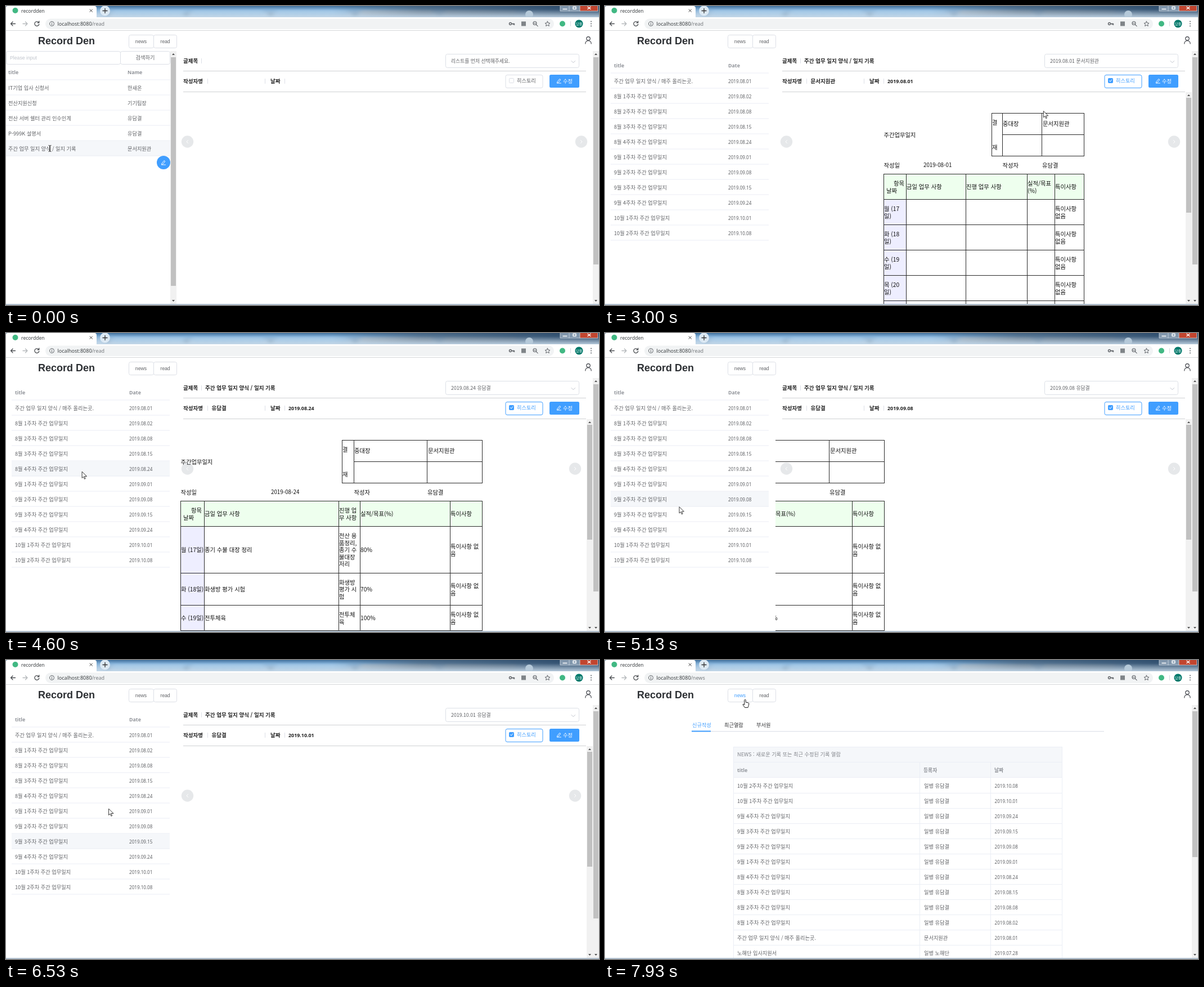
These frames come from a looping animation (1054x531 px, 8000 ms). An HTML page:

```html
<!DOCTYPE html>
<html lang="ko">
<head>
<meta charset="utf-8">
<title>recordden</title>
<style>
  html, body { margin: 0; width: 100%; height: 100%; overflow: hidden; background: #fff; }
  svg { display: block; width: 100%; height: 100%; }
  text { font: 400 9.2px 'Noto Sans CJK KR', 'Noto Sans', sans-serif; fill: #606266; white-space: pre; }
  .date { font-family: 'Noto Sans', sans-serif; font-size: 8.1px; }
  .head { font-family: 'Noto Sans', 'Noto Sans CJK KR', sans-serif; font-size: 8.8px; font-weight: 600; fill: #909399; }
  .strong { font-size: 9.5px; font-weight: 600; fill: #222; }
  .day { font: 600 8.9px 'Noto Sans', sans-serif; fill: #222; }
  .arial { font-family: 'Liberation Sans', Arial, sans-serif; font-size: 8.7px; }
  .brand { font: 700 18px 'Liberation Sans', Arial, sans-serif; fill: #2c2f33; }
  .chrome { font: 400 9px 'Noto Sans', sans-serif; fill: #3c4043; }
  .doc { font-size: 10.3px; fill: #111; }
  .pick { font-size: 8.8px; }
  .mid { text-anchor: middle; }
  .white { fill: #fff; }
  .blue { fill: #409eff; }
</style>
</head>
<body>
<svg id="stage" viewBox="0 0 1054 531">
  <defs>
    <linearGradient id="glass" x2="0" y2="1">
      <stop stop-color="#41719d"/><stop offset=".3" stop-color="#7fadd5"/><stop offset="1" stop-color="#bcd6ed"/>
    </linearGradient>
    <linearGradient id="dusk">
      <stop offset=".55" stop-color="#41566c" stop-opacity="0"/><stop offset=".7" stop-color="#41566c" stop-opacity=".6"/>
      <stop offset="1" stop-color="#23405f" stop-opacity=".9"/>
    </linearGradient>
    <linearGradient id="haze" x2="0" y2="1">
      <stop offset=".3" stop-color="#c3d6e6" stop-opacity="0"/><stop offset="1" stop-color="#c3d6e6" stop-opacity=".9"/>
    </linearGradient>
    <filter id="soft"><feGaussianBlur stdDeviation="4 2"/></filter>
    <clipPath id="pane"><path d="M303 153h728v376H303z"/></clipPath>
    <clipPath id="page"><path d="M0 44h1054v485H0z"/></clipPath>
  </defs>
</svg>
<script>
const BLUE = '#409eff', EDGE = '#dcdfe6', RULE = '#ebeef5', HOVER = '#f5f7fa';
const WRITER = '유담결', OFFICER = '문서지원관', FORM = '주간 업무 일지 양식 / 일지 기록';
const LOOP = 8000, FPS = 15, SLIDE_MS = 400, SLIDE_W = 728, ROW = 27;
const stage = document.getElementById('stage');

function add(parent, tag, attrs = {}, content) {
  const node = document.createElementNS('http://www.w3.org/2000/svg', tag);
  for (const key in attrs) node.setAttribute(key, attrs[key]);
  if (content !== undefined) node.textContent = content;
  return parent.appendChild(node);
}
const group = (parent, attrs) => add(parent, 'g', attrs);
const box = (p, x, y, width, height, fill) => add(p, 'rect', { x, y, width, height, fill });
const frame = (p, x, y, w, h, stroke = EDGE, fill = '#fff', rx = 3) =>
  add(p, 'rect', { x: x + .5, y: y + .5, width: w - 1, height: h - 1, rx, stroke, fill });
const disc = (p, cx, cy, r, fill) => add(p, 'circle', { cx, cy, r, fill });
const line = (p, d, stroke, width = 1, fill = 'none') =>
  add(p, 'path', { d, stroke, fill, 'stroke-width': width, 'stroke-linecap': 'round', 'stroke-linejoin': 'round' });
// y is the visual middle of the line of text
const label = (p, x, y, content, cls = '') => add(p, 'text', { x, y: y + 3.4, class: cls }, content);
const show = (node, on) => node.setAttribute('visibility', on ? 'inherit' : 'hidden');

function scrollbar(p, x, top, bottom, thumbTop, thumbEnd) {
  box(p, x, top, 11, bottom - top, '#f1f1f1');
  const mid = x + 5.5;
  add(p, 'path', { d: `M${mid - 2.5} ${top + 7}l2.5-3 2.5 3zM${mid - 2.5} ${bottom - 7}l2.5 3 2.5-3z`, fill: '#505050' });
  return box(p, x + 1, thumbTop, 9, thumbEnd - thumbTop, '#c1c1c1');
}
function pencil(p, x, y) {
  line(p, `M${x - 2.5} ${y + 1.5}l4-5 1.8 1.4-4 5-2 .4zM${x - 3} ${y + 4}h7`, '#fff', .9);
}

/* browser window */
function buildBrowser() {
  const g = group(stage);
  box(g, 0, 0, 1054, 20, 'url(#glass)');
  const ghosts = group(g, { filter: 'url(#soft)' });
  [190, 330, 480, 630, 780].forEach((x, i) => {
    box(ghosts, x, 8, 128, 10, i < 3 ? '#9cc6e8' : '#b4c6d5');
    box(ghosts, x - 14, 12, 9, 8, '#6d94b5');
  });
  box(g, 0, 0, 1054, 20, 'url(#dusk)');
  box(g, 0, 0, 1054, 20, 'url(#haze)');
  disc(g, 930, 15, 7, '#b5c9d9');
  add(g, 'path', { d: 'M0 20V2q0-2 3-2h154q4 0 4 4v16z', fill: '#fff' });
  disc(g, 16.5, 8, 5, '#41b883');
  label(g, 27, 8.5, 'recordden', 'chrome').style.fontSize = '8.6px';
  line(g, 'M149 6l4.5 4.5m0-4.5l-4.5 4.5', '#444');
  disc(g, 176, 8.5, 9, '#dce9f4');
  line(g, 'M172 8.5h8m-4-4v8', '#333', 1.3);
  box(g, 985, 0, 35, 9, '#8197ad');
  box(g, 1020, 0, 32, 9, '#c2452f');
  line(g, 'M985 0v9h67V0M1001 0v9M1020 0v9', '#d4dde6', .8);
  line(g, 'M990 5.5h7M1008 1.5h5v4h-5zM1034 1.5l5 4m0-4l-5 4', '#fff', 1.4);

  box(g, 0, 20, 1054, 23, '#fff');
  box(g, 0, 43, 1054, 1, '#d6d8da');
  add(g, 'rect', { x: 70, y: 22.5, width: 904, height: 18.5, rx: 9.2, fill: '#f1f3f4' });
  line(g, 'M16.5 31.5H8.5m3.5-3.5l-3.5 3.5 3.5 3.5', '#4a4d51', 1.3);
  line(g, 'M30 31.5h8m-3.5-3.5l3.5 3.5-3.5 3.5', '#b5b8bb', 1.3);
  line(g, 'M58 29a4 4 0 1 0 .8 3.5M58.8 27v2.8h-2.8', '#4a4d51', 1.3);
  line(g, 'M77.5 31.5a4 4 0 1 0 8 0a4 4 0 1 0-8 0M81.5 31v2.5M81.5 29.2v.1', '#5f6368');
  label(g, 91.5, 31.5, 'localhost:8080', 'chrome');
  const path = label(g, 152.5, 31.5, '/read', 'chrome');
  path.style.fill = '#75797d';
  line(g, 'M894.5 31.5a2 2 0 1 0 4 0a2 2 0 1 0-4 0M898.5 31.5h5v2m-2-2v1.5', '#5f6368', 1.4);
  box(g, 916, 27.5, 8, 8, '#7f8488');
  line(g, 'M937 30.5a3 3 0 1 0 6 0a3 3 0 1 0-6 0M942.2 32.8l3 3M938.7 30.5h2.6', '#5f6368', 1.1);
  line(g, 'M962.5 27.2l1.3 2.9 3.2.3-2.4 2.1.7 3.1-2.8-1.6-2.8 1.6.7-3.1-2.4-2.1 3.2-.3z', '#5f6368');
  disc(g, 989, 31.5, 5, '#41b883');
  box(g, 1003, 27, 1, 9, '#d6dade');
  disc(g, 1018.5, 31.5, 7, '#00796b');
  label(g, 1018.5, 30.7, '담결', 'mid white').style.fontSize = '6px';
  [27.5, 31.5, 35.5].forEach(y => disc(g, 1040, y, 1, '#5f6368'));
  box(g, 0, 529, 1054, 2, '#b3c2d1');
  return path;
}

function buildHeader() {
  const g = group(stage);
  label(g, 57, 64.8, 'Record Den', 'brand');
  frame(g, 218, 51, 45, 24);
  frame(g, 262, 51, 42, 24);
  line(g, 'M1031.8 57.8a3.2 3.2 0 1 0 6.4 0a3.2 3.2 0 1 0-6.4 0M1029.8 67c0-7 10.4-7 10.4 0', '#3b3e45', 1.2);
  return [label(g, 240, 62.7, 'news', 'arial mid'), label(g, 283, 62.7, 'read', 'arial mid')];
}

/* sidebars */
function listTable(g, x, right, top, columns, headings, rows) {
  const hover = box(g, x, 0, right - x, ROW, HOVER);
  headings.forEach((h, i) => label(g, columns[i], top - 13.5, h, 'head'));
  box(g, x, top - 1, right - x, 1, RULE);
  rows.forEach((row, r) => {
    const y = top + r * ROW;
    row.forEach((cell, i) => label(g, columns[i], y + 14, cell, /^\d{4}/.test(cell) ? 'date' : ''));
    box(g, x, y + ROW - 1, right - x, 1, RULE);
  });
  return { g, hover, x, right, top, count: rows.length };
}
function buildSearchList(parent) {
  const g = group(parent);
  frame(g, 0, 80, 204, 24);
  label(g, 7, 91.5, 'Please input', 'arial').style.fill = '#c0c4cc';
  frame(g, 203, 80, 89, 24);
  label(g, 247.5, 91.5, '검색하기', 'mid');
  const table = listTable(g, 0, 292, 131.5, [4, 216], ['title', 'Name'], [
    ['IT기업 입사 신청서', '한새온'], ['전산지원신청', '기기팀장'], ['전산 서버 쉘터 관리 인수인계', WRITER],
    ['P-999K 설명서', WRITER], [FORM, OFFICER]]);
  disc(g, 280, 278, 12, BLUE);
  pencil(g, 279.5, 278);
  scrollbar(g, 292, 80, 529, 91, 497);
  return table;
}
const weekly = ['8월 1 02', '8월 2 08', '8월 3 15', '8월 4 24', '9월 1 01', '9월 2 08', '9월 3 15', '9월 4 24', '10월 1 01', '10월 2 08']
  .map(s => {
    const [month, week, day] = s.split(' ');
    return [`${month} ${week}주차 주간 업무일지`, `2019.${month.slice(0, -1).padStart(2, '0')}.${day}`];
  });
const records = [['주간 업무 일지 양식 / 매주 올리는곳.', '2019.08.01'], ...weekly];

/* documents: grid columns, stamp columns and rows of [height, cells]; "|" breaks a line */
const blankDays = ['월 (17', '화 (18', '수 (19', '목 (20', '금 (21'].map(d => [45, [d + '|일)', '', '', '', '특이사항|없음']]);
const form = {
  cols: [495, 535, 641, 750, 799, 851], stamp: [687, 706, 776, 851], dateX: 566,
  heads: ['금일 업무 사항', '진행 업무 사항', '실적/목표|(%)', '특이사항'], rows: blankDays
};
const report = {
  cols: [310, 352, 591, 629, 789, 846], stamp: [597, 618, 748, 846], dateX: 471,
  heads: ['금일 업무 사항', '진행 업|무 사항', '실적/목표(%)', '특이사항'],
  rows: [
    [83, ['월 (17일)', '종기 수불 대장 정리', '전산 용|품정리,|종기 수|불대장|저리', '80%', '특이사항 없|음']],
    [57, ['화 (18일)', '화생방 평가 시험', '화생방|평가 시|험', '70%', '특이사항 없|음']],
    [45, ['수 (19일)', '전투체육', '전투체|육', '100%', '특이사항 없|음']],
    [45, ['목 (20일)', '', '', '', '']]]
};
function cell(g, x, middle, content) {
  const lines = content.split('|');
  lines.forEach((s, i) => label(g, x + 1, middle + (i - (lines.length - 1) / 2) * 12.5, s, 'doc'));
}
function buildDoc(parent, { cols, stamp, dateX, heads, rows }, date) {
  const g = group(parent), left = cols[0], right = cols[5], top = 298;
  const ink = (x, y, w, h) => box(g, x, y, w, h, '#2b2b2b');
  stamp.forEach(x => ink(x, 190, 1, 77));
  [190, 266].forEach(y => ink(stamp[0], y, stamp[3] - stamp[0] + 1, 1));
  ink(stamp[1], 228, stamp[3] - stamp[1], 1);
  cell(g, stamp[0], 207.5, '결');
  cell(g, stamp[0], 251.5, '재');
  cell(g, stamp[1], 210, '중대장');
  cell(g, stamp[2] + 1, 210, OFFICER);
  cell(g, left - .5, 229.5, '주간업무일지');
  cell(g, left - .5, 283.5, '작성일');
  label(g, dateX, 283, date, 'doc').style.fontSize = '9.8px';
  cell(g, stamp[1] - .5, 283.5, '작성자');
  cell(g, stamp[2], 283.5, WRITER);

  box(g, left, top, right - left, 45, '#eeffee');
  cell(g, left + (cols[1] - left) / 2 - 3, 316, '항목');
  cell(g, left + 4, 328.5, '날짜');
  heads.forEach((h, i) => cell(g, cols[i + 1], 322, h));
  ink(left, top, right - left, 1);
  let y = top + 45;
  for (const [height, cells] of rows) {
    box(g, left, y, cols[1] - left, height, '#eeeeff');
    ink(left, y, right - left, 1);
    cells.forEach((c, i) => c && cell(g, cols[i], y + height / 2 + 1.5, c));
    y += height;
  }
  cols.forEach(x => ink(x, top, 1, y - top));
  return g;
}

/* reading pane */
const visits = [
  { at: 1190, index: 0, date: '2019.08.01', author: OFFICER, layout: form, written: '2019-08-01' },
  { at: 4133.2, index: 4, date: '2019.08.24', author: WRITER, layout: report, written: '2019-08-24' },
  { at: 4997.5, index: 6, date: '2019.09.08', author: WRITER, layout: report, written: '2019-09-08' },
  { at: 6333, index: 9, date: '2019.10.01', author: WRITER, layout: report, written: '2019-10-08' }];

function buildReader(parent) {
  const g = group(parent);
  const slides = group(g, { 'clip-path': 'url(#pane)' });
  visits.forEach(v => v.node = buildDoc(slides, v.layout, v.written));
  label(g, 315, 97.5, '글제목', 'strong');
  label(g, 315, 133.5, '작성자명', 'strong');
  label(g, 470, 133.5, '날짜', 'strong');
  [[347, 93], [358, 129], [460, 129], [495, 129]].forEach(([x, y]) => box(g, x, y, 1, 9, EDGE));
  [115, 152].forEach(y => box(g, 315, y, 716, 1, '#cfd1d4'));
  frame(g, 781, 85, 238, 25);
  line(g, 'M1005 97.5l3.3 3.3 3.3-3.3', '#c0c4cc');
  const history = frame(g, 887.5, 122, 67, 24);
  const tick = frame(g, 894, 128, 9, 9, EDGE, '#fff', 1);
  line(g, 'M896.5 132.5l1.5 1.8 2.7-3.5', '#fff');
  const historyText = label(g, 908, 133, '히스토리');
  add(g, 'rect', { x: 966, y: 122, width: 53, height: 23, rx: 2.5, fill: BLUE });
  pencil(g, 982.5, 133);
  label(g, 990, 133.5, '수정', 'white');
  disc(g, 322.5, 241, 10.7, 'rgba(31,45,61,.11)');
  line(g, 'M323.5 238.5l-2.5 2.5 2.5 2.5', '#fff');
  const next = group(g);
  disc(next, 1011.5, 241, 10.7, 'rgba(31,45,61,.11)');
  line(next, 'M1010.5 238.5l2.5 2.5-2.5 2.5', '#fff');
  const inner = group(g);
  scrollbar(inner, 1032, 153, 529, 163, 367);
  return {
    g, history, tick, historyText, next, inner,
    title: label(g, 354, 97.5, '', 'strong'), author: label(g, 365.5, 133.5, '', 'strong'),
    date: label(g, 502, 133.5, '', 'day'), pick: label(g, 791, 97.5, '', 'pick')
  };
}

function buildNews(parent) {
  const g = group(parent);
  box(g, 154, 126, 733, 1.5, '#e4e7ed');
  box(g, 154, 125.5, 34, 2, BLUE);
  label(g, 155, 116, '신규작성', 'blue');
  [[212, '최근열람'], [269, '부서원']].forEach(([x, s]) => label(g, x, 116, s).style.fill = '#303133');
  box(g, 228, 154, 585, 55, HOVER);
  label(g, 235, 168, 'NEWS : 새로운 기록 또는 최근 수정된 기록 열람').style.fill = '#82858b';
  [[235, 'title'], [566, '등록자'], [692, '날짜']].forEach(([x, s]) => label(g, x, 195.5, s, 'head'));
  const entries = [...weekly].reverse().map(([s, date]) => [s, '일병 ' + WRITER, date]);
  entries.push([records[0][0], OFFICER, '2019.08.01'], ['노해단 입사지원서', '일병 노해단', '2019.07.28']);
  entries.forEach(([title, name, date], i) => {
    const y = 209 + i * ROW;
    label(g, 235, y + 14.5, title);
    label(g, 567, y + 14.5, name);
    label(g, 692.5, y + 14.5, date, 'date');
    box(g, 228, y + ROW, 585, 1, RULE);
  });
  [154, 181, 208].forEach(y => box(g, 228, y, 585, 1, RULE));
  [228, 812].forEach(x => box(g, x, 154, 1, 375, RULE));
  [559, 685].forEach(x => box(g, x, 181, 1, 348, RULE));
  return g;
}

/* pointer: time, x, y */
const route = [
  [0, 78, 253], [870, 78, 253], [1000, 64, 256], [1067, 56, 257], [1133, 57, 258], [1267, 120, 285], [1467, 520, 400],
  [1600, 800, 458], [1733, 845, 466], [1800, 851.5, 419], [1933, 830, 350], [2133, 763, 260], [2200, 763, 260],
  [2533, 897, 133], [2800, 897, 133], [3067, 740, 205], [3333, 420, 240], [3667, 140, 282], [3933, 135.5, 230],
  [4533, 135.5, 230], [4800, 134, 296], [4867, 134, 296], [5000, 134, 300], [5067, 133, 303], [5133, 132, 309],
  [5400, 133, 349], [5600, 133, 349], [5800, 131, 358], [5933, 130, 364], [6000, 129.5, 365], [6400, 129.5, 365],
  [6733, 262, 114], [6800, 277, 104.5], [7000, 284, 80], [7133, 281, 60], [7400, 243, 60], [7600, 243, 60], [7933, 249, 70]];
function pointerAt(t) {
  const i = route.findIndex(k => k[0] > t);
  if (i < 0) return route[route.length - 1].slice(1);
  if (i === 0) return route[0].slice(1);
  const [t0, x0, y0] = route[i - 1], [t1, x1, y1] = route[i], f = (t - t0) / (t1 - t0);
  return [x0 + (x1 - x0) * f, y0 + (y1 - y0) * f];
}
const inside = ([x, y], l, t, r, b) => x >= l && x < r && y >= t && y < b;

// cubic-bezier(.42, 0, .58, 1)
function easeInOut(p) {
  let lo = 0, hi = 1;
  for (let i = 0; i < 24; i++) {
    const s = (lo + hi) / 2;
    const x = 1.26 * s * (1 - s) ** 2 + 1.74 * s * s * (1 - s) + s ** 3;
    if (x < p) lo = s; else hi = s;
  }
  return lo * lo * (3 - 2 * lo);
}

const urlPath = buildBrowser();
const [newsText, readText] = buildHeader();
const page = group(stage, { 'clip-path': 'url(#page)' });
const readPage = group(page);
const searchList = buildSearchList(readPage);
const historyList = listTable(group(readPage), 10, 291, 119.5, [16, 219], ['title', 'Date'], records);
const reader = buildReader(readPage);
const newsPage = buildNews(page);
const pageThumb = scrollbar(page, 1043, 80, 529, 91, 459);

const pointer = group(stage);
const shapes = {
  text: line(pointer, 'M-2-5.5q2 0 2 1v9q0 1-2 1M2-5.5q-2 0-2 1v9q0 1 2 1', '#222', 1),
  arrow: line(pointer, 'M0 0v11l2.6-2.4 1.8 4.2 1.7-.8-1.8-4H8z', '#222', .9, '#fff'),
  hand: line(pointer, 'M-1.2 1q1.2-1.6 2.4 0v4l4.6 1q1.2.4 1 2l-.8 3.5-1 3h-5.5l-3.6-5.5q.6-1.8 2.9.2z', '#222', 1, '#fff')
};

function hoverRow(list, [x, y]) {
  const row = Math.floor((y - list.top) / ROW);
  show(list.hover, x >= list.x && x < list.right && row >= 0 && row < list.count);
  list.hover.setAttribute('y', list.top + row * ROW);
}

function drawReader(t) {
  const current = visits.filter(v => v.at <= t).length - 1;
  const visit = visits[current], previous = visits[current - 1];
  const checked = t >= 2660;
  reader.title.textContent = visit ? FORM : '';
  reader.author.textContent = visit ? visit.author : '';
  reader.date.textContent = visit ? visit.date : '';
  reader.pick.textContent = visit ? `${visit.date} ${visit.author}` : '리스트를 먼저 선택해주세요.';
  show(reader.inner, visit);
  reader.next.setAttribute('transform', `translate(${visit ? 0 : 11} 0)`);
  reader.history.setAttribute('stroke', checked ? BLUE : EDGE);
  reader.tick.setAttribute('stroke', checked ? BLUE : EDGE);
  reader.tick.setAttribute('fill', checked ? BLUE : '#fff');
  reader.historyText.style.fill = checked ? BLUE : '#606266';
  show(searchList.g, !checked);
  show(historyList.g, checked);

  visits.forEach(v => show(v.node, v === visit));
  if (!visit) return;
  const span = previous ? (visit.index - previous.index) * SLIDE_W : 0;
  const p = Math.min(1, (t - visit.at) / SLIDE_MS), shift = Math.round(span * easeInOut(p));
  visit.node.setAttribute('transform', `translate(${span - shift} 0)`);
  if (previous && p < 1) {
    show(previous.node, true);
    previous.node.setAttribute('transform', `translate(${-shift} 0)`);
  }
}

function draw(t) {
  const at = pointerAt(t), felt = pointerAt(Math.max(0, t - 1000 / FPS));
  const onNews = t >= 7660;
  show(readPage, !onNews);
  show(newsPage, onNews);
  urlPath.textContent = onNews ? '/news' : '/read';
  pageThumb.setAttribute('height', onNews ? 259 : 368);
  newsText.style.fill = inside(felt, 218, 51, 262, 75) ? BLUE : '#606266';
  readText.style.fill = inside(felt, 262, 51, 304, 75) ? BLUE : '#606266';
  drawReader(t);
  [searchList, historyList].forEach(list => hoverRow(list, felt));

  const onButton = inside(at, 218, 51, 304, 75) || inside(at, 887, 122, 955, 146);
  const kind = t < 1190 ? 'text' : onButton ? 'hand' : 'arrow';
  for (const name in shapes) show(shapes[name], name === kind);
  pointer.setAttribute('transform', `translate(${at[0]} ${at[1]})`);
}

const start = performance.now();
function tick() {
  const elapsed = (performance.now() - start) % LOOP;
  draw(Math.floor((elapsed + 4) * FPS / 1000) * 1000 / FPS % LOOP);
  requestAnimationFrame(tick);
}
tick();
</script>
</body>
</html>
```
